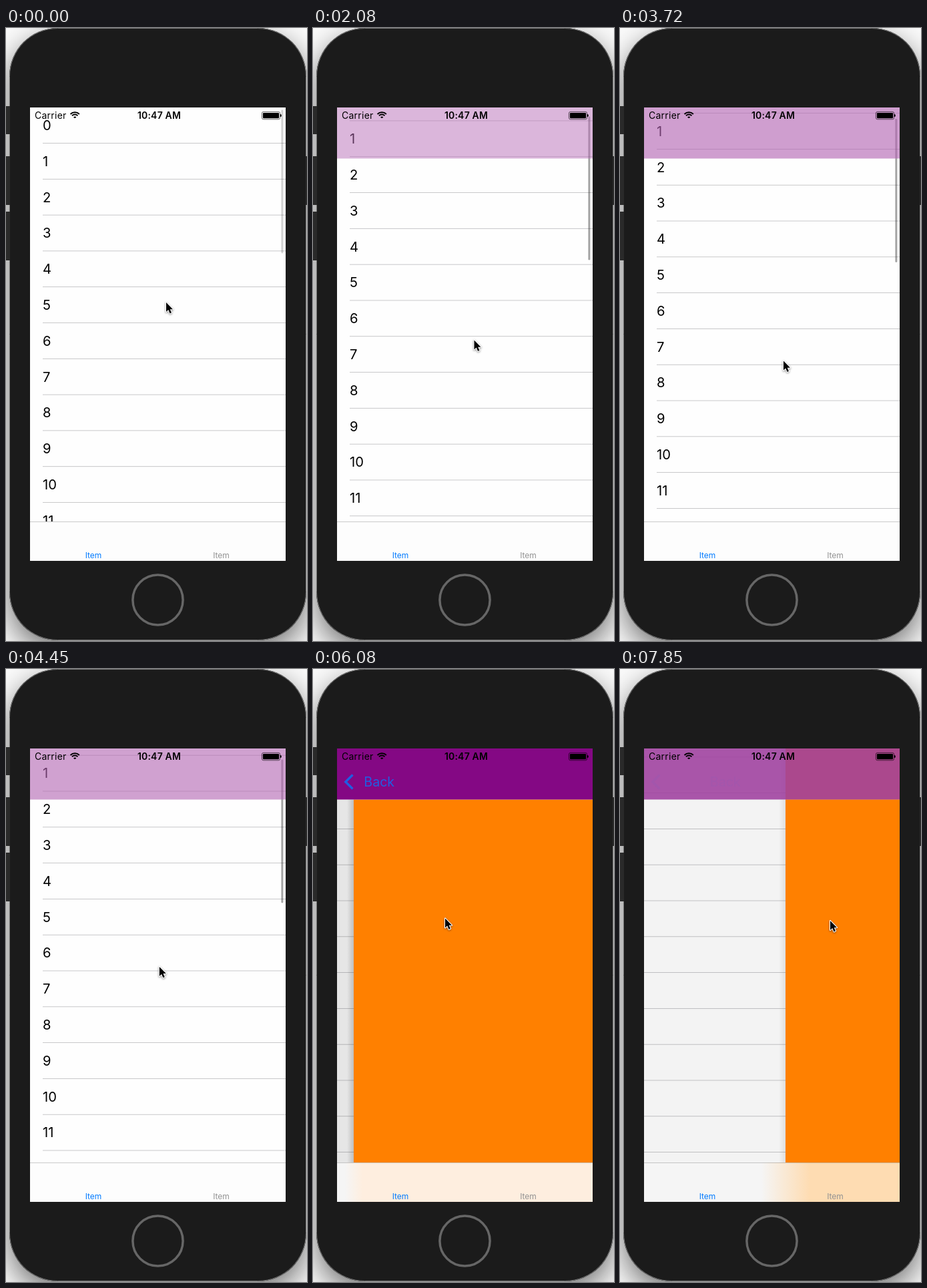
These frames come from a looping animation (451x918 px, 8000 ms). An HTML page with a canvas:

```html
<!DOCTYPE html>
<html lang="en">
<head>
<meta charset="utf-8">
<title>Fading navigation bar</title>
<style>
  html, body { margin: 0; width: 100%; height: 100%; overflow: hidden; background: #fff; }
  canvas { display: block; }
</style>
</head>
<body>
<canvas id="stage" width="451" height="918"></canvas>
<script>
const ctx = document.getElementById('stage').getContext('2d');
const LOOP = 8000, STEP = 148.1, LAST_STEP = 53;
const SCREEN = { x: 36, y: 119, w: 383, h: 679 };
const RIGHT = SCREEN.x + SCREEN.w;
const NAV_H = 76.5, TAB_Y = 739, ROW_H = 53.8;
const FONT = 'Inter, "Liberation Sans", sans-serif';

const PUSH_START = 5630, PUSH_END = 6370, SWIPE_START = 6970, SWIPE_END = 7850;
const SWIPE_REACH = 0.553;

// Turning points of the scrolling hand: time, scroll, cursor x, cursor y
const gesture = [
  [0, 0, 240, 411],
  [1480, 53.2, 241, 459],
  [2670, 13.8, 242, 476],
  [3720, 45.4, 245, 499],
  [5340, 40.7, 211, 380],
];

const lerp = (a, b, k) => a + (b - a) * k;
const clamp = v => Math.max(0, Math.min(1, v));
const phase = (t, from, to) => clamp((t - from) / (to - from));
const easeOut = (k, power) => 1 - (1 - k) ** power;
const rgb = c => `rgb(${c.map(Math.round).join(',')})`;

function follow(points, t) {
  const next = points.findIndex(p => p[0] > t);
  if (next < 0) return points.at(-1).slice(1);
  const a = points[next - 1], b = points[next];
  const k = phase(t, a[0], b[0]);
  return a.map((v, i) => lerp(v, b[i], k)).slice(1);
}

// How far the list is uncovered: 1 shows the list, 0 the detail page.
function popAt(t) {
  if (t < SWIPE_START) return 1 - easeOut(phase(t, PUSH_START, PUSH_END), 3);
  return SWIPE_REACH * easeOut(phase(t, SWIPE_START, SWIPE_END), 1.1);
}

function cursorAt(t, x, y) {
  const reach = phase(t, 5780, 6860);
  const swipe = easeOut(phase(t, SWIPE_START, SWIPE_END), 1.45);
  return [
    lerp(lerp(x, 33, reach ** 2), 315, swipe),
    lerp(lerp(y, 356, reach), 377, swipe),
  ];
}

function rect(x, y, w, h, fill) {
  ctx.fillStyle = fill;
  ctx.fillRect(x, y, w, h);
}

function roundRect(x, y, w, h, r, fill, stroke) {
  ctx.beginPath();
  ctx.roundRect(x, y, w, h, r);
  if (fill) { ctx.fillStyle = fill; ctx.fill(); }
  if (stroke) { ctx.strokeStyle = stroke; ctx.stroke(); }
}

function text(str, x, y, size, fill, { weight = 400, align = 'left', spacing = 0 } = {}) {
  ctx.font = `${weight} ${size}px ${FONT}`;
  ctx.textAlign = align;
  ctx.letterSpacing = spacing + 'px';
  ctx.fillStyle = fill;
  ctx.fillText(str, x, y);
}

function drawDevice() {
  rect(0, 0, 451, 918, '#fbfbfb');
  ctx.save();
  ctx.shadowColor = 'rgba(0,0,0,.55)';
  ctx.shadowBlur = 44;
  ctx.shadowOffsetY = 16;
  roundRect(5, 0, 445, 917, 72, '#1b1b1b');
  ctx.restore();
  ctx.lineWidth = 1;
  roundRect(5.5, 0.5, 444, 916, 72, null, '#777');
  [[117, 42], [192, 73], [275, 73]].forEach(([y, h]) => rect(0, y, 6, h, '#2a2a2a'));
  rect(449, 192, 2, 73, '#2a2a2a');
  ctx.beginPath();
  ctx.arc(227.5, 856.5, 37.6, 0, Math.PI * 2);
  ctx.lineWidth = 3.5;
  ctx.strokeStyle = '#666';
  ctx.stroke();
}

function drawList(scroll, pop, barAlpha) {
  const x = 55 - 0.3 * SCREEN.w * (1 - pop);
  rect(SCREEN.x, SCREEN.y, SCREEN.w, SCREEN.h, '#fefefe');
  for (let n = 0; n < 14; n++) {
    const top = SCREEN.y + n * ROW_H - scroll;
    text(String(n), x, top + 33.9, 20.2, '#000');
    rect(x, top + ROW_H - 0.7, SCREEN.w, 0.8, '#bbbbbd');
  }
  roundRect(412.4, 122.5 + scroll * 0.3, 2.9, 215, 1.4, `rgba(0,0,0,${barAlpha})`);
}

function drawDetail(pop, edge) {
  const cover = 1 - pop;
  rect(SCREEN.x, SCREEN.y, edge - SCREEN.x, SCREEN.h, `rgba(0,0,0,${0.1 * cover})`);
  const shade = ctx.createLinearGradient(edge - 10, 0, edge, 0);
  shade.addColorStop(0, 'rgba(0,0,0,0)');
  shade.addColorStop(1, `rgba(0,0,0,${0.18 * cover})`);
  rect(edge - 10, SCREEN.y, 10, SCREEN.h, shade);
  rect(edge, SCREEN.y, RIGHT - edge, SCREEN.h, '#ff8000');
}

function drawTabs(pop, edge) {
  const gray = 253 - 8 * clamp((1 - pop) * 4);
  const plain = rgb([gray, gray, gray]);
  let fill = plain;
  if (pop < 1) {
    const tint = rgb([254, 240 - 36 * pop, 229 - 92 * pop]);
    const spread = lerp(10, 36, clamp(pop * 2));
    fill = ctx.createLinearGradient(edge - spread, 0, edge + spread, 0);
    fill.addColorStop(0, pop > 0 ? plain : tint);
    fill.addColorStop(1, tint);
  }
  rect(SCREEN.x, TAB_Y, SCREEN.w, SCREEN.y + SCREEN.h - TAB_Y, fill);
  rect(SCREEN.x, TAB_Y, SCREEN.w, 1, 'rgba(0,0,0,.2)');
  text('Item', 131, 794, 12, '#007aff', { align: 'center' });
  text('Item', 322.5, 794, 12, '#929292', { align: 'center' });
}

function drawNav(scroll, pop) {
  const base = scroll * 0.0085;
  const alpha = 1 - (1 - base) * pop ** 1.1;
  for (const color of ['255,255,255', '128,0,128']) {
    rect(SCREEN.x, SCREEN.y, SCREEN.w, NAV_H, `rgba(${color},${alpha})`);
  }
  ctx.save();
  ctx.globalAlpha = (1 - pop) ** 4;
  ctx.beginPath();
  ctx.moveTo(59.5, 158.5);
  ctx.lineTo(48.8, 169);
  ctx.lineTo(59.5, 179.5);
  ctx.lineWidth = 3.4;
  ctx.strokeStyle = '#007aff';
  ctx.stroke();
  text('Back', 68.5 + 120 * pop, 176, 19.6, '#007aff');
  ctx.restore();
}

function drawStatus() {
  text('Carrier', 43, 136, 14, '#000', { spacing: 0.25 });
  text('10:47 AM', 229.5, 136, 14, '#000', { weight: 600, align: 'center', spacing: 0.2 });
  ctx.strokeStyle = ctx.fillStyle = '#000';
  ctx.lineWidth = 2;
  for (const r of [9.4, 6, 2]) {
    ctx.beginPath();
    ctx.arc(103.2, 135.6, r, -Math.PI * 0.75, -Math.PI * 0.25);
    ctx.stroke();
  }
  ctx.lineWidth = 0.6;
  roundRect(383.4, 125.4, 27.2, 11.4, 2.4, null, '#000');
  roundRect(384.9, 126.9, 24.2, 8.4, 1.2, '#000');
  roundRect(411, 129, 1.7, 4, [0, 1.5, 1.5, 0], '#000');
}

function drawCursor(x, y) {
  ctx.save();
  ctx.translate(x, y);
  ctx.beginPath();
  [[0, 0], [0, 14], [3.2, 11], [5.6, 16.4], [8, 15.3], [5.7, 10.2], [10, 10.2]]
    .forEach(([px, py]) => ctx.lineTo(px, py));
  ctx.closePath();
  ctx.lineJoin = 'round';
  ctx.lineWidth = 2.2;
  ctx.strokeStyle = '#fff';
  ctx.shadowColor = 'rgba(0,0,0,.45)';
  ctx.shadowBlur = 3;
  ctx.shadowOffsetY = 1;
  ctx.stroke();
  ctx.shadowColor = 'transparent';
  ctx.fillStyle = '#000';
  ctx.fill();
  ctx.restore();
}

function draw(now) {
  // The picture advances in even, discrete steps.
  const t = Math.min(LAST_STEP, Math.floor((now % LOOP + 5) / STEP)) * STEP;
  const [scroll, x, y] = follow(gesture, t);
  const pop = popAt(t);
  const edge = Math.round(SCREEN.x + SCREEN.w * pop);
  const barAlpha = lerp(0.18, 0.36, phase(t, 0, 150)) * (1 - phase(t, 5100, 5400));

  drawDevice();
  ctx.save();
  ctx.beginPath();
  ctx.rect(SCREEN.x, SCREEN.y, SCREEN.w, SCREEN.h);
  ctx.clip();
  drawList(scroll, pop, barAlpha);
  if (pop < 1) drawDetail(pop, edge);
  drawTabs(pop, edge);
  drawNav(scroll, pop);
  drawStatus();
  ctx.restore();
  drawCursor(...cursorAt(t, x, y));
}

let start;
function tick(now) {
  start ??= now;
  draw(now - start);
  requestAnimationFrame(tick);
}
draw(0);
requestAnimationFrame(tick);
</script>
</body>
</html>
```
